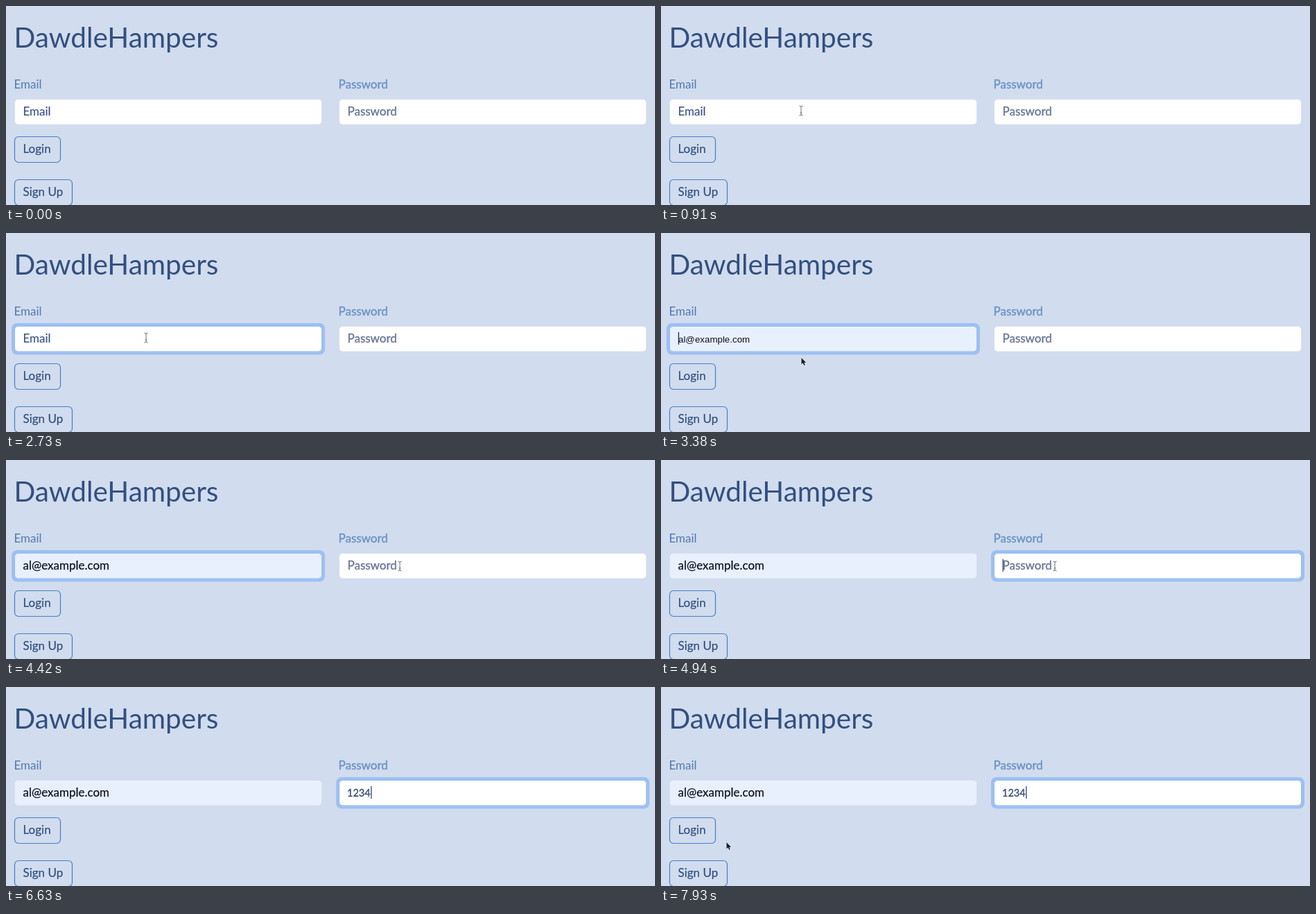
Write an HTML page with a canvas that moves like this. It is 936 by 287 pixels and loops after 8 s.

```html
<!DOCTYPE html>
<html lang="en">
<head>
<meta charset="utf-8">
<title>Login form</title>
<style>
  html, body { margin: 0; width: 100%; height: 100%; overflow: hidden; background: #d1dcee; }
  canvas { display: block; }
</style>
</head>
<body>
<canvas id="stage" width="936" height="287"></canvas>
<script>
const ctx = document.getElementById('stage').getContext('2d');
const LOOP = 8000, TICK = 130, BLINK = 520;
const SANS = 'Lato, "Open Sans", sans-serif';
const NAVY = '#32507f';
const EMAIL = 'al@example.com';

const CLICK_EMAIL = 1170, PREVIEW = 3250, ACCEPT = 3770, CLICK_PASS = 4810;
const KEYS = [5980, 6110, 6370, 6500];

// Pointer trips: start, end, from, to, moment the shape changes, shapes
const TRIPS = [
  { t0: 130, t1: 910, from: [188, 292], to: [202, 151], swap: 780, shapes: ['arrow', 'beam'] },
  { t0: 2860, t1: 3380, from: [202, 151], to: [202.5, 180], swap: 3250, shapes: ['beam', 'arrow'] },
  { t0: 3640, t1: 4420, from: [202.5, 180], to: [568, 153], swap: 4290, shapes: ['arrow', 'beam'] },
  { t0: 7020, t1: 7800, from: [568, 153], to: [94.5, 224], swap: 7280, shapes: ['beam', 'arrow'] }
];

const clamp = v => Math.max(0, Math.min(1, v));
const ease = v => v * v * (3 - 2 * v);
const fade = (t, click) => clamp((t - click + 65) / 195);
const blinkOn = dt => dt >= 0 && Math.floor(dt / BLINK) % 2 === 0;

// "bold" adds a hairline outline for a medium weight
function text(str, x, y, color, { size = 17, bold = 0, family = SANS } = {}) {
  ctx.font = `${size}px ${family}`;
  ctx.fillStyle = ctx.strokeStyle = color;
  ctx.fillText(str, x, y);
  if (bold) {
    ctx.lineWidth = bold;
    ctx.lineJoin = 'round';
    ctx.strokeText(str, x, y);
  }
  return ctx.measureText(str).width;
}

function box(x, y, w, h, r, fill, stroke, line = 1) {
  ctx.beginPath();
  ctx.roundRect(x, y, w, h, r);
  if (fill) { ctx.fillStyle = fill; ctx.fill(); }
  if (stroke) { ctx.strokeStyle = stroke; ctx.lineWidth = line; ctx.stroke(); }
}

function field(x, fill, glow) {
  ctx.globalAlpha = glow;
  box(x - 4, 130, 452, 45.5, 8, '#9dc0f2');
  ctx.globalAlpha = 1;
  box(x + .5, 134.5, 443, 36.5, 5, fill, '#d6e0ef');
  ctx.globalAlpha = glow;
  box(x + .5, 134.5, 443, 36.5, 5, null, '#93bcf5');
  ctx.globalAlpha = 1;
}

function button(label, y, w) {
  box(12.5, y + .5, w, 37, 5.5, null, '#4680c2', 1.2);
  text(label, 24.5, y + 24, NAVY, { bold: .2 });
}

function caret(x, color) {
  ctx.fillStyle = color;
  ctx.fillRect(x, 143, 1.3, 18);
}

function arrow(x, y) {
  const pts = [[0, 0], [0, 9.5], [2.2, 7.5], [3.8, 11], [5.4, 10.3], [3.9, 7], [6.8, 7]];
  ctx.beginPath();
  pts.forEach(([px, py]) => ctx.lineTo(x + px, y + py));
  ctx.closePath();
  ctx.lineJoin = 'round';
  ctx.lineWidth = 1.4;
  ctx.strokeStyle = '#eef2f9';
  ctx.stroke();
  ctx.fillStyle = '#1d2028';
  ctx.fill();
}

function beam(x, y) {
  ctx.beginPath();
  for (const side of [-1, 1]) {
    ctx.moveTo(x + 2.5 * side, y - 7);
    ctx.quadraticCurveTo(x, y - 7, x, y - 5);
    ctx.moveTo(x + 2.5 * side, y + 7);
    ctx.quadraticCurveTo(x, y + 7, x, y + 5);
  }
  ctx.moveTo(x, y - 5);
  ctx.lineTo(x, y + 5);
  ctx.moveTo(x - 1.5, y + 3);
  ctx.lineTo(x + 1.5, y + 3);
  ctx.lineWidth = 1;
  ctx.strokeStyle = '#6d727c';
  ctx.stroke();
}

function pointer(t) {
  if (t < 260 || (t >= KEYS[0] && t < 7150)) return;
  const trip = TRIPS.filter(p => t >= p.t0).pop();
  const k = ease(clamp((t - trip.t0) / (trip.t1 - trip.t0)));
  const [x, y] = trip.from.map((v, i) => v + (trip.to[i] - v) * k);
  const shape = trip.shapes[t < trip.swap ? 0 : 1];
  (shape === 'beam' ? beam : arrow)(x, y);
}

function emailField(t) {
  const glow = fade(t, CLICK_EMAIL) - fade(t, CLICK_PASS);
  field(12, t >= PREVIEW ? '#e8f0fe' : '#fff', glow);
  if (t >= ACCEPT) text(EMAIL, 24.5, 158, '#0c1020', { bold: .25 });
  else if (t >= PREVIEW) text(EMAIL, 25, 157.5, '#0c1020', { size: 13.33, family: '"Liberation Sans", Arial, sans-serif' });
  else text('Email', 24.5, 158, '#3c5488', { bold: .2 });
  if (t < ACCEPT && blinkOn(t - CLICK_EMAIL)) caret(24.8, '#1c2740');
}

function passwordField(t) {
  field(480, '#fff', fade(t, CLICK_PASS));
  const typed = KEYS.filter(k => t >= k).length;
  let w = 0;
  if (typed) w = text('1234'.slice(0, typed), 492, 158, '#3f5377', { size: 14.5, bold: .4 });
  else text('Password', 492.5, 158, '#6a7899', { bold: .4 });
  const since = typed ? KEYS[typed - 1] : CLICK_PASS;
  if (blinkOn(t - since)) caret(492.5 + w, '#34486f');
}

function draw(now) {
  const t = Math.floor((now % LOOP) / TICK) * TICK;
  ctx.fillStyle = '#d1dcee';
  ctx.fillRect(0, 0, 936, 287);
  text('DawdleHampers', 11.5, 60, NAVY, { size: 40.5 });
  text('Email', 11.5, 118.5, '#5079b1');
  text('Password', 479.5, 118.5, '#6b92c5', { bold: .4 });
  emailField(t);
  passwordField(t);
  button('Login', 188, 66);
  button('Sign Up', 250, 83);
  pointer(t);
}

let start;
function tick(now) {
  start ??= now;
  draw(now - start);
  requestAnimationFrame(tick);
}
draw(0);
requestAnimationFrame(tick);
</script>
</body>
</html>
```
